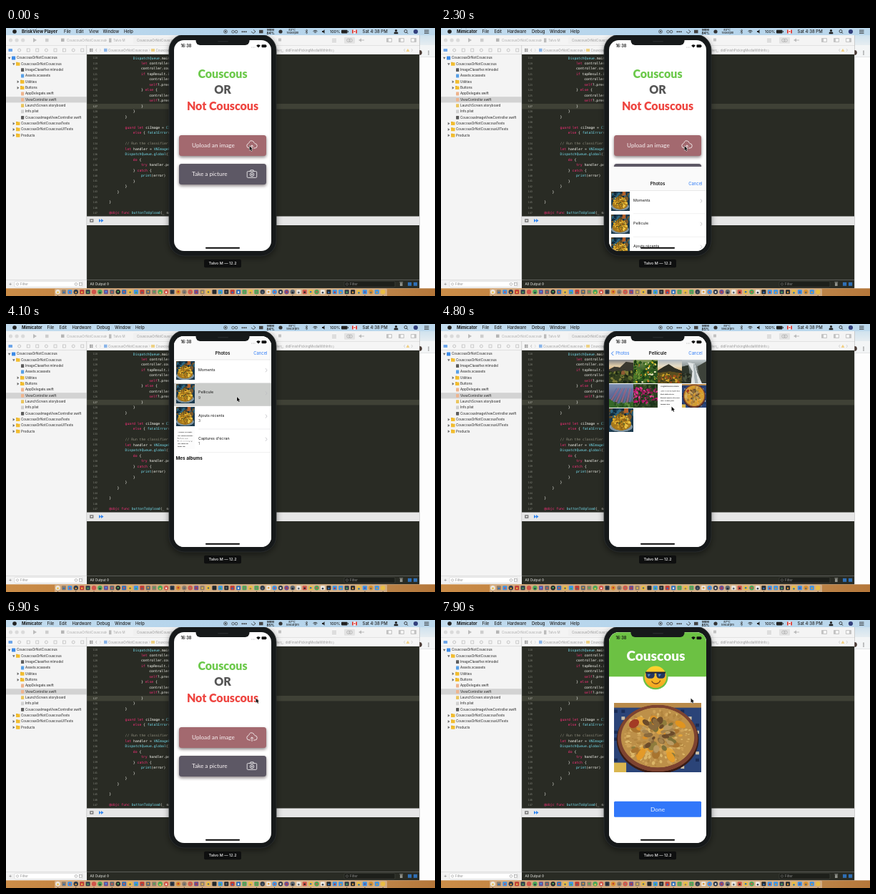
An HTML page with a canvas that plays this animation: 600x375 px, repeating every 8000 ms.

```html
<!DOCTYPE html>
<html lang="en">
<head>
<meta charset="utf-8">
<title>Couscous app demo</title>
<style>
html, body { margin: 0; width: 100%; height: 100%; overflow: hidden; background: #f5f5f5; }
canvas { display: block; width: 600px; height: 375px; }
</style>
</head>
<body>
<canvas id="stage"></canvas>
<script>
const W = 600, H = 375, LOOP = 8000;
const DPR = Math.max(1, window.devicePixelRatio || 1);
const UI = 'Inter, "Liberation Sans", sans-serif';
const ROUND = 'Lato, "Open Sans", sans-serif';
const CODE = '"DejaVu Sans Mono", monospace';
const BLUE = '#2f7cf6', EDITOR = '#292b24', SHELL = '#16191a';
const SCREEN = { x: 235, y: 17, w: 136, h: 295 };

const stage = document.getElementById('stage');
const main = stage.getContext('2d');
let g = main;
stage.width = W * DPR;
stage.height = H * DPR;

// Drawing helpers
function layer(w, h, scale, draw) {
  const c = document.createElement('canvas');
  c.width = w * scale;
  c.height = h * scale;
  const old = g;
  g = c.getContext('2d');
  g.scale(scale, scale);
  draw();
  g = old;
  return c;
}
function rect(x, y, w, h, color) { g.fillStyle = color; g.fillRect(x, y, w, h); }
function round(x, y, w, h, r, color) {
  g.beginPath();
  g.roundRect(x, y, w, h, r);
  if (color) { g.fillStyle = color; g.fill(); }
}
function oval(x, y, rx, ry, color, turn = 0) {
  g.beginPath();
  g.ellipse(x, y, rx, ry, turn, 0, Math.PI * 2);
  g.fillStyle = color;
  g.fill();
}
function dot(x, y, r, color) { oval(x, y, r, r, color); }
function ring(x, y, r, color, lw = 0.7) {
  g.beginPath();
  g.arc(x, y, r, 0, Math.PI * 2);
  g.strokeStyle = color;
  g.lineWidth = lw;
  g.stroke();
}
function path(pts, color, lw) {
  g.beginPath();
  for (let i = 0; i < pts.length; i += 2) g.lineTo(pts[i], pts[i + 1]);
  if (lw) { g.strokeStyle = color; g.lineWidth = lw; g.stroke(); }
  else { g.fillStyle = color; g.fill(); }
}
function text(s, x, y, size, color, weight = 400, font = UI, align = 'left') {
  g.font = `${weight} ${size}px ${font}`;
  g.fillStyle = color;
  g.textAlign = align;
  g.textBaseline = 'middle';
  g.fillText(s, x, y);
}
function blend(x0, y0, x1, y1, colors) {
  const f = g.createLinearGradient(x0, y0, x1, y1);
  colors.forEach((c, i) => f.addColorStop(i / (colors.length - 1), c));
  return f;
}
const fade = (y0, y1, ...colors) => blend(0, y0, 0, y1, colors);
const across = (...colors) => blend(0, 0, W, 0, colors);
function shadow(color, blur, dy, draw) {
  g.save();
  g.shadowColor = color;
  g.shadowBlur = blur * DPR;
  g.shadowOffsetY = dy * DPR;
  draw();
  g.restore();
}
function random(seed) {
  return () => (seed = (seed * 16807) % 2147483647) / 2147483647;
}
function scatter(n, seed, colors, r, x, y, w, h) {
  const rnd = random(seed * 7919);
  for (let i = 0; i < n; i++) {
    const s = r * (0.5 + rnd());
    oval(x + rnd() * w, y + rnd() * h, s, s * 0.7, colors[i % colors.length], rnd() * 3);
  }
}
function scatterDisc(n, seed, colors, r, cx, cy, rx, ry) {
  const rnd = random(seed * 7919);
  for (let i = 0; i < n; i++) {
    const a = rnd() * 6.283, d = Math.sqrt(rnd()), s = r * (0.5 + rnd());
    oval(cx + Math.cos(a) * d * rx, cy + Math.sin(a) * d * ry, s, s * 0.65, colors[i % colors.length], a);
  }
}

// Pictures, each on a 100 by 100 field
function plate(big) {
  rect(0, 0, 100, 100, '#2b4478');
  for (let i = 0; i < 12; i++)
    for (let j = 0; j < 10; j++)
      if ((i * 3 + j * 5) % 4 < 2) rect(i * 8.5, j * 10, 4, 4.5, (i + j) % 3 ? '#1a2c55' : '#c9bfa8');
  rect(0, 0, 100, 7, '#b98a4a');
  rect(0, 86, 14, 14, '#d9b64f');
  oval(50, 53, 47, 49, '#3a1c15');
  oval(50, 51, 46, 48, '#7d4330');
  oval(50, 50, 42, 43, big ? '#bd9049' : '#d39c30');
  scatterDisc(big ? 260 : 70, 3, ['#cfa257', '#b2853f', '#dcb769'], big ? 2 : 4, 50, 50, 39, 40);
  scatterDisc(24, 8, ['#d98f28', '#a8742f', '#e3a53a', '#8f7c3c'], 5, 50, 50, 34, 34);
  scatterDisc(44, 5, ['#8a6a3d', '#a5834e', '#6b4b2a', '#b99a62', '#7d7038'], 4, 48, 45, 22, 24);
  oval(23, 30, 5, 7, '#a33a24', 0.6);
  oval(76, 31, 7, 4, '#e0941f', 0.7);
  oval(31, 74, 4, 9, '#e49a28', 0.4);
  oval(65, 78, 4, 8, '#e59d2c', -0.4);
}
const scenes = [
  () => {
    rect(0, 0, 100, 100, fade(0, 55, '#7c7f86', '#e2cda8', '#d99a55'));
    path([0, 42, 22, 30, 45, 34, 70, 10, 100, 14, 100, 100, 0, 100], '#3a382f');
    path([0, 58, 35, 46, 70, 52, 100, 44, 100, 100, 0, 100], '#33401f');
    scatter(60, 2, ['#55652a', '#1b2614', '#27341a', '#7b7a35'], 6, 0, 52, 100, 48);
    path([50, 64, 50, 52, 58, 46, 66, 52, 66, 64], '#8e5a33');
  },
  () => {
    rect(0, 0, 100, 100, fade(0, 100, '#8a9c62', '#2f5522', '#24461b'));
    scatter(110, 4, ['#4d7a29', '#1d3d15', '#6e9236', '#2c5a1e'], 6, 0, 8, 100, 92);
    scatter(30, 6, ['#e8c42a', '#efe8bd', '#d97f25'], 3.5, 0, 12, 100, 84);
  },
  () => {
    rect(0, 0, 100, 100, fade(0, 55, '#a9b4bd', '#e6ddc6', '#d9a860'));
    path([0, 46, 25, 30, 45, 20, 70, 36, 100, 48, 100, 70, 0, 70], '#2e2f24');
    path([0, 56, 50, 50, 100, 58, 100, 100, 0, 100], '#5c4f1f');
    scatter(75, 9, ['#c99d24', '#77631e', '#37371a', '#a34c1d'], 4.5, 0, 58, 100, 42);
  },
  () => {
    rect(0, 0, 100, 100, fade(0, 100, '#c3cccf', '#646d69', '#2b302a'));
    path([0, 30, 26, 24, 34, 100, 0, 100], '#2d352b');
    path([62, 30, 100, 8, 100, 100, 80, 100], '#3d423a');
    path([22, 12, 52, 18, 62, 55, 82, 100, 36, 100, 42, 50], '#dfe4e4');
    path([46, 20, 51, 20, 66, 100, 52, 100], '#a9b4b7');
    scatter(25, 17, ['#23291f', '#4b5440'], 5, 0, 55, 34, 45);
  },
  () => {
    rect(0, 0, 100, 100, fade(0, 100, '#7f93b4', '#63668f', '#3d5a34'));
    for (let i = 0; i < 9; i++)
      path([i * 12 - 15, 85, i * 8 + 30, 18, i * 8 + 34, 18, i * 12 - 8, 85], i % 2 ? '#98607f' : '#596d9f');
    path([0, 62, 30, 84, 100, 76, 100, 100, 0, 100], '#356829');
    scatter(30, 19, ['#2a4f24', '#5d8a3c'], 4, 0, 78, 100, 22);
  },
  () => {
    rect(0, 0, 100, 100, '#2c4023');
    scatter(60, 7, ['#1b3319', '#47602f'], 7, 0, 0, 100, 100);
    scatter(85, 11, ['#c01c72', '#db3f90', '#8c144f'], 5, 0, 18, 100, 62);
    scatter(25, 21, ['#1c301a', '#32492a'], 5, 0, 40, 100, 60);
  },
  () => {
    rect(0, 0, 100, 100, '#fcfcfc');
    text('Programme de la semaine', 12, 12, 6, '#333', 700);
    ['Lundi : lecture du chapitre deux', 'Mardi : atelier et notes', 'Mercredi : exercices de groupe',
      'Jeudi : visite du jardin', 'Vendredi : bilan'].forEach((s, i) => text(s, 10, 30 + i * 14, 5.4, '#222', 600));
  },
  () => plate(false),
  () => {
    rect(0, 0, 100, 100, '#1d3c50');
    scatter(45, 13, ['#2d6680', '#122b3c', '#54452a', '#7d5a2a'], 8, 0, 0, 100, 48);
    rect(62, 0, 18, 20, '#b3602a');
    oval(50, 78, 48, 21, '#7f93a0');
    oval(50, 66, 42, 27, '#a3761c');
    scatterDisc(130, 15, ['#dba92a', '#ebc64c', '#b27f1d', '#8f6218'], 5, 50, 56, 36, 30);
    scatterDisc(14, 6, ['#6b4118', '#5a6428'], 3.5, 50, 48, 26, 20);
  }
];
function picture(draw, w, h) {
  return layer(w, h, DPR * 2, () => { g.scale(w / 100, h / 100); draw(); });
}
const thumbs = scenes.map(s => picture(s, 34, 34));
const meal = picture(() => plate(true), 122, 98);

// Desktop
const code = `4 DispatchQueue.main.async {
5 let controller = Result
5 controller.couscous
5 if topResult.identifier
6 controller.isOk
6 self?.present
5 } else {
6 controller.isOk
6 self?.present
5 }
4 }
3 }

3 guard let ciImage = CIImage
4 else { fatalError(

3 // Run the classifier
3 let handler = VNImageRequest
3 DispatchQueue.global().async
4 do {
5 try handler.perform
4 } catch {
5 print(error)
4 }
3 }
2 }

1 }

1 @objc func buttonToUpload(_ sender`.split('\n');
const keyword = /^(let|if|else|guard|do|try|catch|func|@objc|self)$/;

function codeLine(row, i) {
  const y = 42.3 + i * 7.48;
  text(String(118 + i), 128, y, 3.6, i === 9 ? '#d5d5cc' : '#85877d', 400, CODE, 'right');
  if (!row) return;
  const s = row.slice(2), step = 2.86;
  let x = 133 + row[0] * 11.2;
  if (s.startsWith('//')) return text(s, x, y, 4.75, '#918f7f', 400, CODE);
  for (const part of s.match(/@?\w+|\s+|[^\w\s@]/g)) {
    let color = '#fdfdf6';
    if (keyword.test(part)) color = '#f92f79';
    else if (/^(DispatchQueue|VNImage|CIImage|fatalError|print|global|buttonToUpload)/.test(part)) color = '#76dff0';
    text(part, x, y, 4.75, color, 400, CODE);
    x += part.length * step;
  }
}

const files = [
  [15, 'CouscousOrNotCouscous', 'p'], [21, 'CouscousOrNotCouscous', 'd'], [27, 'ImageClassifier.mlmodel', 'm'],
  [27, 'Assets.xcassets', 'a'], [27, 'Utilities', 'd'], [27, 'Buttons', 'd'], [27, 'AppDelegate.swift', 's'],
  [27, 'ViewController.swift', 's'], [27, 'LaunchScreen.storyboard', 'b'], [27, 'Info.plist', 'f'],
  [27, 'CouscousImageViewController.swift', 'm'], [21, 'CouscousOrNotCouscousTests', 'd'],
  [21, 'CouscousOrNotCouscousUITests', 'd'], [21, 'Products', 'd']
];
const fileColor = { m: '#5d5d5d', a: '#58a0e6', s: '#eeb48e', b: '#eac65e', f: '#d0d0d0' };
function sidebar() {
  rect(0, 37, 113, 327, '#f4f4f4');
  rect(0, 96.2, 113, 8.2, '#d3d3d3');
  files.forEach(([x, name, kind], i) => {
    const y = 42 + i * 8.33;
    if (kind === 'd') {
      round(x - 7, y - 2.2, 5.5, 4.6, 0.6, '#f2bd2f');
      rect(x - 7, y - 2.6, 2.5, 1, '#dfaa25');
      const open = i === 1;
      path(open ? [x - 12, y - 1.2, x - 8.4, y - 1.2, x - 10.2, y + 1.8] : [x - 11.4, y - 2, x - 8.6, y, x - 11.4, y + 2], '#6b6b6b');
    } else if (kind === 'p') {
      path([2.8, y - 1.2, 6.4, y - 1.2, 4.6, y + 1.8], '#6b6b6b');
      round(x - 7, y - 2.6, 5.2, 5.2, 0.7, '#3c8be8');
    } else {
      round(x - 6, y - 2.4, 4.2, 4.8, 0.6, fileColor[kind]);
    }
    text(name, x, y, 4.6, '#222');
  });
  rect(112.5, 24, 0.6, 340, '#bbb');
}
function filterBox(x, y, w, fill, edge) {
  round(x, y - 4, w, 8, 1.5, fill);
  g.strokeStyle = edge;
  g.lineWidth = 0.5;
  g.stroke();
  ring(x + 4, y, 1.6, '#888', 0.5);
  text('Filter', x + 8, y + 0.3, 4.6, '#8c8c8c');
}
function toolbar() {
  rect(0, 10, 600, 14.5, '#f4f4f4');
  rect(0, 24, 600, 13, '#f5f5f5');
  rect(0, 24, 600, 0.5, '#cfcfcf');
  rect(0, 36.5, 578, 0.6, '#c8c8c8');
  for (let i = 0; i < 3; i++) dot(6.5 + i * 8.6, 17, 2.6, '#dadada');
  path([38, 14, 43, 17, 38, 20], '#bbb');
  rect(55, 14.8, 4.5, 4.5, '#cdcdcd');
  rect(77, 14.6, 4.5, 4.5, '#b5b5b5');
  text('CouscousOrNotCouscous', 85, 17.3, 4.5, '#aaa');
  path([139, 15.5, 140.6, 17.2, 139, 18.9], '#bbb', 0.6);
  rect(144, 14.4, 3.4, 5.8, '#bbb');
  text('Talvo M', 150, 17.3, 4.5, '#aaa');
  round(178, 12.5, 198, 9.5, 1.5, '#f0f0f0');
  text('CouscousOrNotCouscous', 183, 17.3, 4.5, '#999');
  round(473, 12.8, 15, 9, 1.2, '#e3e3e3');
  for (let i = 0; i < 3; i++) {
    rect(456, 15 + i * 2, 6, 0.7, '#b5b5b5');
    round(532 + i * 17, 14, 8, 6, 0.8, '#c4c4c4');
    rect(533 + i * 17 + (i === 2 ? 0 : 2), 15, 4, 4, '#f5f5f5');
  }
  ring(479, 17.2, 2.3, '#aaa');
  ring(482, 17.2, 2.3, '#aaa');
  path([493, 17, 497, 14.6, 497, 19.4], '#bbb');
  path([497, 17, 501, 17], '#bbb', 1);
  path([368, 14, 371, 17, 368, 20], '#bbb', 0.7);
  rect(381, 14.5, 4, 4, '#c2c2c2');

  for (let i = 0; i < 9; i++) {
    const x = 6 + i * 12.6;
    if (i === 0) round(x - 2.5, 29, 5.5, 4, 0.5, '#6ea6ea');
    else if (i % 3 === 1) ring(x, 31, 2, '#b0b0b0');
    else { g.strokeStyle = '#b0b0b0'; g.lineWidth = 0.6; g.strokeRect(x - 2, 29, 4, 4); }
  }
  for (let i = 0; i < 4; i++) rect(117 + (i % 2) * 2.5, 28.8 + (i >> 1) * 2.5, 1.9, 1.9, '#8f8f8f');
  path([127, 29, 125.5, 31, 127, 33], '#999', 0.6);
  path([131, 29, 132.5, 31, 131, 33], '#ccc', 0.6);
  rect(137, 28.7, 4.5, 4.5, '#8ab5e9');
  text('CouscousOrNotCouscous', 143, 31.2, 4.5, '#999');
  path([200, 29.4, 201.5, 31, 200, 32.6], '#bbb', 0.6);
  rect(203, 29, 5, 4, '#edd184');
  text('CouscousOrNot', 209.5, 31.2, 4.5, '#999');
  text('ler(_: didFinishPickingMediaWithInfo:)', 379, 31.2, 4.5, '#999');
  path([558, 29, 556.5, 31, 558, 33], '#bbb', 0.6);
  path([562, 28.8, 564.4, 33, 559.6, 33], '#f0cf82');
  path([567, 29, 568.5, 31, 567, 33], '#bbb', 0.6);
}
function dock() {
  rect(0, 364.3, W, 10.7, across('#cb8d48', '#b97a3c', '#c79a62', '#b5773a'));
  round(68, 364.8, 465, 11, 1.5, 'rgba(228,205,178,.55)');
  const colors = ['#3b94e6', '#5c6670', '#d1554a', '#2f6fb8', '#ece8e2', '#d9922f', '#4aa657',
    '#24282d', '#2f3a4a', '#c03a34', '#e9bd45', '#6b4f93', '#8f7d6b'];
  const rnd = random(45821);
  for (let i = 0; i < 55; i++) {
    const x = 72.5 + i * 8.42, c = colors[Math.floor(rnd() * colors.length)];
    if (rnd() < 0.45) dot(x, 369.2, 3.2, c);
    else round(x - 3, 366.2, 6, 6, 1, c);
    dot(x, 369 + rnd() * 1.5, 1.3, colors[Math.floor(rnd() * colors.length)]);
    if (i % 3 === 0) dot(x, 374.2, 0.5, '#222');
  }
}
const desktop = layer(W, H, DPR, () => {
  rect(0, 0, W, H, '#f7f7f7');
  toolbar();
  rect(113, 37, 465, 315.5, EDITOR);
  rect(113, 106, 465, 7.4, '#3f4136');
  code.forEach(codeLine);
  rect(113, 263.5, 465, 12.5, '#e6e6e6');
  round(117, 267, 5.5, 5, 0.8, '#888');
  path([118.3, 268.8, 121.2, 268.8, 119.7, 270.8], '#fff');
  path([130, 267, 133, 269.5, 130, 272], '#2d83ef');
  path([133, 267, 136.5, 269.5, 133, 272], '#2d83ef');
  sidebar();
  rect(0, 352.5, 113, 11.8, '#f1f1f1');
  rect(0, 352.3, 113, 0.5, '#c8c8c8');
  rect(113, 352.5, 465, 11.8, EDITOR);
  text('+', 6, 358.2, 7, '#777', 400, UI, 'center');
  filterBox(12, 358.4, 95, '#fff', '#c8c8c8');
  ring(98, 358.4, 1.8, '#888', 0.6);
  g.strokeStyle = '#888';
  g.strokeRect(102.5, 356.6, 3.6, 3.6);
  text('All Output ◊', 117.5, 358.6, 4.8, '#e6e6e2');
  filterBox(473, 358.4, 71, '#1d1f1a', '#4b4d46');
  rect(551, 356.4, 3.6, 4.6, '#8f918a');
  rect(550.4, 355.3, 4.8, 0.8, '#8f918a');
  rect(562, 355.8, 5.2, 5, '#2f6fb5');
  rect(570, 355.8, 5.2, 5, '#2f6fb5');
  rect(578.6, 10, 21.4, 14, fade(10, 24, '#cfe2ee', '#e6edf1'));
  rect(578.6, 24, 21.4, 17, '#f3f5f6');
  rect(578.6, 41, 21.4, 323, '#fdfdfd');
  rect(578.6, 40.5, 21.4, 0.5, '#d5d5d5');
  rect(578, 10, 0.6, 354, '#b5b5b5');
  g.beginPath();
  g.arc(578.4, 34.5, 3.4, -Math.PI / 2, Math.PI / 2);
  g.fillStyle = '#4a3b35';
  g.fill();
  for (let i = 0; i < 3; i++) dot(591, 32.5 + i * 2.2, 0.7, '#555');
  dock();
});

function flag(x) {
  rect(x, 2.5, 7, 5, '#fff');
  rect(x, 2.5, 1.8, 5, '#d93a35');
  rect(x + 5.2, 2.5, 1.8, 5, '#d93a35');
  dot(x + 3.5, 5, 1, '#d93a35');
}
function menuBar(t) {
  rect(0, 0, W, 10, across('#c3dcee', '#b3d3eb', '#bcd8ec'));
  dot(12, 5, 2.8, '#222');
  const early = t < 1900;
  text(early ? 'BriskView Player' : 'Mimicator', 22, 5.2, early ? 6.1 : 5.8, '#151515', 700);
  const items = early
    ? [['File', 81], ['Edit', 98], ['View', 116], ['Window', 135.5], ['Help', 165]]
    : [['File', 57.5], ['Edit', 74.5], ['Hardware', 92.5], ['Debug', 127], ['Window', 152], ['Help', 181]];
  items.forEach(([s, x]) => text(s, x, 5.2, 5.8, '#222', 500));

  ring(307, 5, 2.4, '#333');
  dot(307, 5, 1, '#333');
  ring(317.5, 5.2, 1.8, '#333');
  ring(322, 5.2, 1.8, '#333');
  for (let i = 0; i < 3; i++) dot(330.5 + i * 2.6, 5.2, 1, '#333');
  path([346, 2.5, 349, 5, 346, 7.5, 343, 5], '#333', 0.8);
  rect(354, 2.8, 5.5, 4.5, '#444');
  text('MEM', 370, 2.8, 4, '#222', 700, UI, 'center');
  text(t < 4500 ? '84%' : '85%', 370, 7.2, 4.8, '#222', 700, UI, 'center');
  dot(384, 5, 2.6, '#333');
  text(t < 2900 ? '83°C' : t < 5100 ? '85°C' : '87°C', 400, 2.9, 4, '#222', 500, UI, 'center');
  text(t < 2900 ? '1936rpm' : t < 5100 ? '5943rpm' : '5944rpm', 401, 7.2, 4, '#222', 500, UI, 'center');
  path([418.5, 3.4, 422, 6.4, 420.3, 8, 420.3, 2, 422, 3.6, 418.5, 6.6], '#333', 0.6);
  for (let i = 0; i < 3; i++) {
    g.beginPath();
    g.arc(432.5, 7.6, 1 + i * 1.6, Math.PI * 1.25, Math.PI * 1.75);
    g.strokeStyle = '#222';
    g.lineWidth = 0.9;
    g.stroke();
  }
  path([442, 4, 443.5, 4, 445.5, 2.3, 445.5, 7.8, 443.5, 6, 442, 6], '#222');
  text('100%', 453, 5.2, 5.3, '#222', 500);
  round(469, 2.8, 8.5, 4.6, 0.8, '#222');
  rect(478, 4, 0.8, 2.2, '#222');
  flag(484);
  text('Sat 4:38 PM', 498.5, 5.2, 6, '#222', 500);
  dot(545.5, 3.6, 1.6, '#222');
  round(542.7, 5.4, 5.6, 2.8, [1.4, 1.4, 0, 0], '#222');
  ring(559, 4.5, 2, '#222', 0.8);
  path([560.4, 6, 562, 7.7], '#222', 0.9);
  dot(573, 5, 3.1, '#33407c');
  for (let i = 0; i < 3; i++) rect(585, 2.7 + i * 2.1, 6.5, 0.8, '#222');
}

// Phone screens
function button(y, color, label) {
  shadow('rgba(40,25,30,.55)', 4, 2, () => round(242, y, 122, 29, 3.5, color));
  text(label, 260, y + 14.6, 8.2, '#f8f2f3', 400, ROUND);
}
function home() {
  rect(235, 17, 136, 295, '#fff');
  text('Couscous', 303, 65.5, 16, '#6cc94b', 900, ROUND, 'center');
  text('OR', 303, 87.5, 16, '#555', 900, ROUND, 'center');
  text('Not Couscous', 303, 110, 16, '#ee4540', 900, ROUND, 'center');
  button(150, '#a3696f', 'Upload an image');
  button(190, '#5d5865', 'Take a picture');
  g.strokeStyle = '#fff';
  g.lineWidth = 0.8;
  g.beginPath();
  g.moveTo(342, 168);
  g.lineTo(340, 168);
  g.arc(340, 164.7, 3.2, Math.PI / 2, Math.PI * 1.4);
  g.arc(343.5, 161.7, 3.8, Math.PI * 1.1, Math.PI * 1.9);
  g.arc(348, 164.9, 3.2, Math.PI * 1.5, Math.PI * 0.5);
  g.lineTo(346, 168);
  g.stroke();
  path([344, 170, 344, 164], '#fff', 0.8);
  path([341.8, 166, 344, 163.8, 346.2, 166], '#fff', 0.8);
  g.beginPath();
  g.roundRect(337.2, 200.6, 13.5, 8.8, 1.2);
  g.stroke();
  path([341, 200.4, 342, 198.8, 346, 198.8, 347, 200.4], '#fff', 0.8);
  ring(344, 205, 2.7, '#fff', 0.8);
  dot(344, 205, 1, '#fff');
}
function navBar(title) {
  rect(235, 17, 136, 33, '#fafafa');
  rect(235, 49.8, 136, 0.4, '#c8c8c8');
  text(title, 303, 41.3, 6.1, '#111', 600, UI, 'center');
  text('Cancel', 365.5, 41.3, 5.9, BLUE, 400, UI, 'right');
}
function albums(t) {
  rect(235, 17, 136, 295, '#fff');
  [['Moments', '', 8], ['Pellicule', '9', 8], ['Ajouts récents', '3', 8], ["Captures d'écran", '1', 6]]
    .forEach(([name, count, pic], i) => {
      const y = 50.5 + i * 32.2;
      if (i === 1 && t > 4000) rect(235, y, 136, 32.2, '#cbcdcb');
      g.drawImage(thumbs[pic], 237.5, y + 1.3, 26, 26.5);
      text(name, 269, y + (i ? 13 : 14), 5.35, '#111');
      if (t > 2600) text(count, 269, y + 20.5, 5, '#444');
      path([363, y + 11.6, 365, y + 14.2, 363, y + 16.8], '#bdbdc2', 0.8);
      rect(269, y + 31.9, 102, 0.4, '#d8d8da');
    });
  text('Mes albums', 237.5, 188.5, 6.3, '#111', 700);
  navBar('Photos');
}
function roll() {
  rect(235, 17, 136, 295, '#fff');
  thumbs.forEach((pic, i) => g.drawImage(pic, 235 + (i % 4) * 34.1, 49.5 + Math.floor(i / 4) * 34.1, 33.5, 33.5));
  navBar('Pellicule');
  path([241, 38.4, 238.2, 41.2, 241, 44], BLUE, 1);
  text('Photos', 244, 41.3, 5.9, BLUE);
}
function face(x, y) {
  dot(x, y, 17.6, '#6cc143');
  dot(x, y, 15.3, fade(y - 15, y + 15, '#ffd52f', '#f5a51f'));
  round(x - 13.5, y - 6.5, 12.2, 8.5, [1.5, 1.5, 4.5, 4.5], '#253760');
  round(x + 1.3, y - 6.5, 12.2, 8.5, [1.5, 1.5, 4.5, 4.5], '#253760');
  rect(x - 14, y - 7.2, 28, 2, '#1b2338');
  path([x - 11, y - 4, x - 7, y - 4, x - 10, y], '#4c8ccc');
  path([x + 4, y - 4, x + 8, y - 4, x + 5, y], '#4c8ccc');
  g.beginPath();
  g.arc(x + 0.5, y + 3, 6.5, 0.3, 2.7);
  g.strokeStyle = '#76471c';
  g.lineWidth = 1.4;
  g.stroke();
}
function result() {
  rect(235, 17, 136, 295, '#fff');
  rect(235, 17, 136, 62, '#6cc143');
  text('Couscous', 300.5, 50.5, 19, '#fff', 900, ROUND, 'center');
  face(300, 79.5);
  g.drawImage(meal, 242, 115.5, 122, 97.5);
  round(242, 253.5, 122, 22, 1.5, '#3177fa');
  text('Done', 303, 264.8, 8.4, '#eef4ff', 400, ROUND, 'center');
}
function statusBar() {
  text('16:38', 244.5, 25.4, 5.6, '#111', 600);
  for (let i = 0; i < 4; i++) dot(343.5 + i * 1.5, 27, 0.4, '#888');
  g.beginPath();
  g.moveTo(353, 27.5);
  g.arc(353, 27.5, 4, Math.PI * 1.25, Math.PI * 1.75);
  g.fillStyle = '#111';
  g.fill();
  round(357.5, 23.3, 6.5, 4, 1, '#111');
  rect(364.4, 24.6, 0.6, 1.5, '#111');
}

// Motion
const spring = ms => ms <= 0 ? 0 : 1 - (1 + ms * 0.0136) * Math.exp(-ms * 0.0136);
const clamp = v => Math.max(0, Math.min(1, v));
const ease = v => v * v * (3 - 2 * v);
function shifted(dx, dy, draw) {
  g.save();
  g.translate(dx, dy);
  draw();
  g.restore();
}
function picker(t) {
  const push = spring(t - 4150);
  if (push < 0.998) shifted(-41 * push, 0, () => albums(t));
  if (push > 0) shifted(SCREEN.w * (1 - push), 0, roll);
}
function phone(t) {
  shadow('rgba(0,0,0,.45)', 9, 3, () => round(228, 9, 150, 310, 22, SHELL));
  g.strokeStyle = '#2c3031';
  g.lineWidth = 0.8;
  g.stroke();
  g.save();
  round(SCREEN.x, SCREEN.y, SCREEN.w, SCREEN.h, 14);
  g.clip();
  home();
  const away = SCREEN.h * (1 - spring(t - 2200) + spring(t - 5950));
  if (t > 2200 && t < 6700) shifted(0, away, () => picker(t));
  if (t > 7200) shifted(0, SCREEN.h * (1 - spring(t - 7200)), result);
  statusBar();
  round(279, 306.8, 48, 1.9, 1, '#080808');
  g.restore();
  round(265.5, 10, 75, 14, [0, 0, 6, 6], SHELL);
  round(296, 18, 15, 1.5, 0.8, '#25292a');
  round(277, 323.7, 52, 11.5, 2, '#0e0f0f');
  text('Talvo M — 12.2', 303, 329.7, 5.4, '#f0f0f0', 500, UI, 'center');
}
const track = [[0, 340.5, 165], [2700, 340.5, 165], [3500, 323, 102], [4300, 323, 102],
  [4700, 322.5, 115.5], [5000, 322.5, 115.5], [5400, 349.5, 109.5], [LOOP, 349.5, 109.5]];
function cursor(t) {
  const i = track.findIndex(p => p[0] > t);
  const [t0, x0, y0] = track[i - 1], [t1, x1, y1] = track[i];
  const k = ease(clamp((t - t0) / (t1 - t0)));
  shifted(x0 + (x1 - x0) * k, y0 + (y1 - y0) * k, () => {
    const arrow = [0, 0, 0, 6.2, 1.5, 4.9, 2.6, 7.3, 3.7, 6.8, 2.6, 4.5, 4.5, 4.4, 0, 0];
    path(arrow, '#fff', 0.9);
    path(arrow, '#111');
  });
}
function draw(t) {
  g.setTransform(DPR, 0, 0, DPR, 0, 0);
  g.drawImage(desktop, 0, 0, W, H);
  phone(t);
  menuBar(t);
  cursor(t);
}
const start = performance.now();
function tick() {
  draw((performance.now() - start) % LOOP);
  requestAnimationFrame(tick);
}
tick();
</script>
</body>
</html>
```
